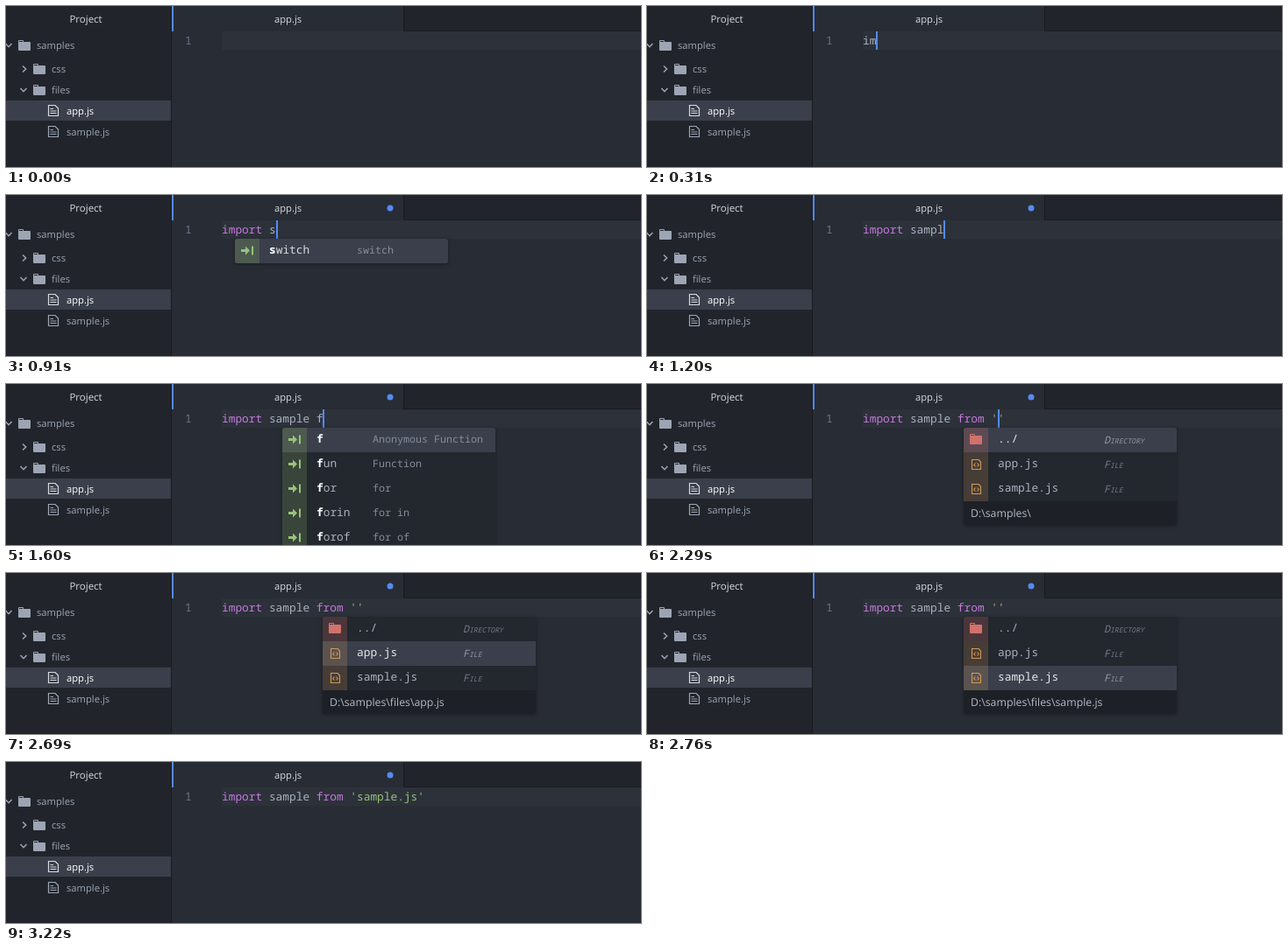
An HTML page with a canvas that plays this animation: 724 px wide and 184 px high, repeating every 3380 ms.

```html
<!DOCTYPE html>
<html lang="en">
<head>
<meta charset="utf-8">
<title>Editor autocomplete</title>
<style>
html, body { margin: 0; width: 100%; height: 100%; overflow: hidden; background: #282c34; }
canvas { display: block; }
</style>
</head>
<body>
<canvas id="stage" width="724" height="184"></canvas>
<script>
const ctx = document.getElementById('stage').getContext('2d', { alpha: false });
ctx.textRendering = 'geometricPrecision';

const LOOP = 3380, LEFT = 246, ADV = 7.7, ROW = 28;
const MONO = '"Noto Sans Mono", "DejaVu Sans Mono", monospace';
const UI = '"Open Sans", "Noto Sans", sans-serif';
const CODE = '12.83px ' + MONO, LABEL = '11.67px ' + MONO, TREE = '11.2px ' + UI;
const GREY = '#abb2bf', ICON = '#9da5b4', PURPLE = '#c678dd', GREEN = '#98c379', BLUE = '#568af2';
const LINE = "import sample from 'sample.js";

// [time, characters typed]
const KEYS = [[0, 0], [230, 1], [310, 2], [390, 3], [490, 5], [580, 6], [740, 7],
  [910, 8], [985, 9], [1060, 10], [1130, 11], [1200, 12], [1280, 13], [1430, 14],
  [1600, 15], [1680, 16], [1830, 17], [1910, 18], [2080, 19], [2290, 20], [2920, 29]];

const FOR = [['for', 'for'], ['forin', 'for in'], ['forof', 'for of']];
// Snippet lists keyed by the number of characters typed
const SNIPPETS = {
  1: { at: 0, typed: 'i', width: 402, label: 117, rows: [['if', 'if'], ['ife', 'if … else'],
    ['iife', 'Immediately-Invoked Function Expression'], ['interval', 'setInterval'], ['isnan', 'isNaN']] },
  8: { at: 7, typed: 's', rows: [['switch', 'switch']] },
  15: { at: 14, typed: 'f', rows: [['f', 'Anonymous Function'], ['fun', 'Function'], ...FOR], label: 103 },
  16: { at: 14, typed: 'fr', rows: FOR },
  17: { at: 14, typed: 'fro', rows: [FOR[2]] }
};
const PATHS = [['../', 'Directory', 'D:\\samples\\'],
  ['app.js', 'File', 'D:\\samples\\files\\app.js'],
  ['sample.js', 'File', 'D:\\samples\\files\\sample.js']];

function rect(x, y, w, h, color) {
  ctx.fillStyle = color;
  ctx.fillRect(x, y, w, h);
}

function text(s, x, y, color, font) {
  ctx.font = font;
  ctx.fillStyle = color;
  ctx.fillText(s, x, y);
}

function path(color, d, x, y, width) {
  ctx.save();
  ctx.translate(x, y);
  const p = new Path2D(d);
  if (width) {
    ctx.strokeStyle = color;
    ctx.lineWidth = width;
    ctx.stroke(p);
  } else {
    ctx.fillStyle = color;
    ctx.fill(p);
  }
  ctx.restore();
}

function folder(x, y, color) {
  path(color, 'M0 1Q0 0 1 0H5Q6 0 6 1V2H13Q14 2 14 3V11Q14 12 13 12H1Q0 12 0 11ZM1 1V2H5V1Z', x, y);
}

function page(x, y, color) {
  path(color, 'M.5 .5H8L11.5 4V12.5H.5ZM2.5 4.5H6M2.5 7H9.5M2.5 9.5H9.5', x, y, 1.2);
}

function codeFile(x, y, color) {
  path(color, 'M.5 .5H8L10.5 3V11.5H.5ZM4.5 4.5L2.7 6.5L4.5 8.5M6.5 4.5L8.3 6.5L6.5 8.5', x, y, 1.1);
}

function chevron(x, y, open) {
  path(ICON, open ? 'M-3.5 -2L0 1.7L3.5 -2' : 'M-2 -3.5L1.7 0L-2 3.5', x, y, 1.5);
}

function sidebar() {
  rect(0, 0, 188, 184, '#21252b');
  rect(0, 108, 188, 23, '#3a3f4b');
  rect(188, 0, 1, 184, '#181a1f');
  ctx.textAlign = 'center';
  text('Project', 91, 19, '#d7dae0', '11.5px ' + UI);
  ctx.textAlign = 'left';
  chevron(3, 45, true);
  chevron(21, 72, false);
  chevron(20, 96, true);
  folder(14, 39, ICON);
  folder(31, 66, ICON);
  folder(31, 90, ICON);
  page(48, 113, '#d7dae0');
  page(48, 137, ICON);
  text('samples', 35, 49, ICON, TREE);
  text('css', 52, 76, ICON, TREE);
  text('files', 52, 100, ICON, TREE);
  text('app.js', 69, 124, '#ffffff', TREE);
  text('sample.js', 69, 148, ICON, TREE);
}

function tabs(modified) {
  rect(454, 0, 270, 28, '#21252b');
  rect(453, 0, 1, 29, '#181a1f');
  rect(454, 28, 270, 1, '#181a1f');
  rect(189, 0, 2, 29, BLUE);
  text('app.js', 306, 19, '#d7dae0', TREE);
  if (modified) path(BLUE, 'M-3.5 0A3.5 3.5 0 1 1 3.5 0A3.5 3.5 0 1 1 -3.5 0', 438, 15);
}

function code(t, n) {
  rect(LEFT, 29, 478, 21, '#2c313a');
  text('1', 204, 44, '#6b7489', CODE);
  const word = (from, to, color) =>
    text(LINE.slice(from, Math.min(n, to)), LEFT + from * ADV, 44, color, CODE);
  word(0, 6, n >= 6 ? PURPLE : GREY);
  word(7, 13, GREY);
  word(14, 18, n >= 18 ? PURPLE : GREY);
  if (n >= 20) {
    const color = n > 20 ? GREEN : t < 2520 ? '#a3a69c' : '#b9a86a';
    word(19, 29, color);
    text("'", LEFT + n * ADV, 44, color, CODE);
  }
  const hidden = t < 230 || (t >= 2690 && t < 2920) || t >= 3220;
  if (!hidden) rect(Math.round(LEFT + n * ADV - 0.1), 29, 2, 21, '#528bff');
}

function panel(x, width, height, draw) {
  ctx.save();
  ctx.beginPath();
  ctx.roundRect(x, 50, width, height, 3);
  ctx.shadowColor = 'rgba(0,0,0,.35)';
  ctx.shadowBlur = 4;
  ctx.shadowOffsetY = 1;
  ctx.fillStyle = '#23272e';
  ctx.fill();
  ctx.shadowColor = 'transparent';
  ctx.clip();
  draw();
  ctx.restore();
}

// Letters matched by the typed prefix are bold and white
function matched(s, typed, x, y, color) {
  let k = 0;
  [...s].forEach((c, i) => {
    const hit = c === typed[k];
    if (hit) k++;
    text(c, x + i * ADV, y, hit ? '#ffffff' : color, (hit ? 'bold ' : '') + CODE);
  });
}

function snippets({ at, typed, rows, width = 243, label = 139 }) {
  const x = Math.round(LEFT + at * ADV) - 39;
  panel(x, width, rows.length * ROW, () => rows.forEach(([name, info], i) => {
    const y = 50 + i * ROW;
    if (!i) rect(x, y, width, ROW, '#3a3f4b');
    rect(x, y, ROW, ROW, i ? '#39443b' : '#4d5a50');
    path(GREEN, 'M0 3.5H5V0L10 5L5 10V6.5H0ZM12 0H14V10H12Z', x + 7, y + 8.5);
    matched(name, typed, x + 39, y + 17, i ? GREY : '#d7dae0');
    text(info, x + label, y + 17, '#868d9a', LABEL);
  }));
}

function smallCaps(s, x, y, color) {
  text(s[0], x, y, color, 'italic 11.6px ' + MONO);
  text(s.slice(1).toUpperCase(), x + 7, y, color, 'italic 8.1px ' + MONO);
}

function paths(chosen) {
  const x = 361;
  panel(x, 243, 111, () => {
    PATHS.forEach(([name, kind], i) => {
      const y = 50 + i * ROW, on = i === chosen;
      if (on) rect(x, y, 243, ROW, '#3a3f4b');
      if (i) {
        rect(x, y, ROW, ROW, on ? '#5b5350' : '#473d37');
        codeFile(x + 9, y + 8, '#d19a56');
      } else {
        rect(x, y, ROW, ROW, on ? '#5d4a53' : '#4a363b');
        folder(x + 7, y + 7, '#d0736c');
      }
      text(name, x + 39, y + 17, on ? '#e6e8ec' : GREY, (on ? '500 ' : '') + CODE);
      smallCaps(kind, x + 160, y + 18, on ? '#8f96a3' : '#737a87');
    });
    rect(x, 134, 243, 27, '#1d2026');
    text(PATHS[chosen][2], 369, 152, '#b4bac5', '12.3px ' + UI);
  });
}

function draw(t) {
  const n = KEYS.findLast(([at]) => at <= t)[1];
  rect(0, 0, 724, 184, '#282c34');
  sidebar();
  tabs(t >= 490);
  code(t, n);
  if (SNIPPETS[n]) snippets(SNIPPETS[n]);
  if (n === 20) paths(t < 2600 ? 0 : t < 2760 ? 1 : 2);
}

const start = performance.now();
function tick() {
  draw((performance.now() - start) % LOOP);
  requestAnimationFrame(tick);
}
tick();
</script>
</body>
</html>
```
